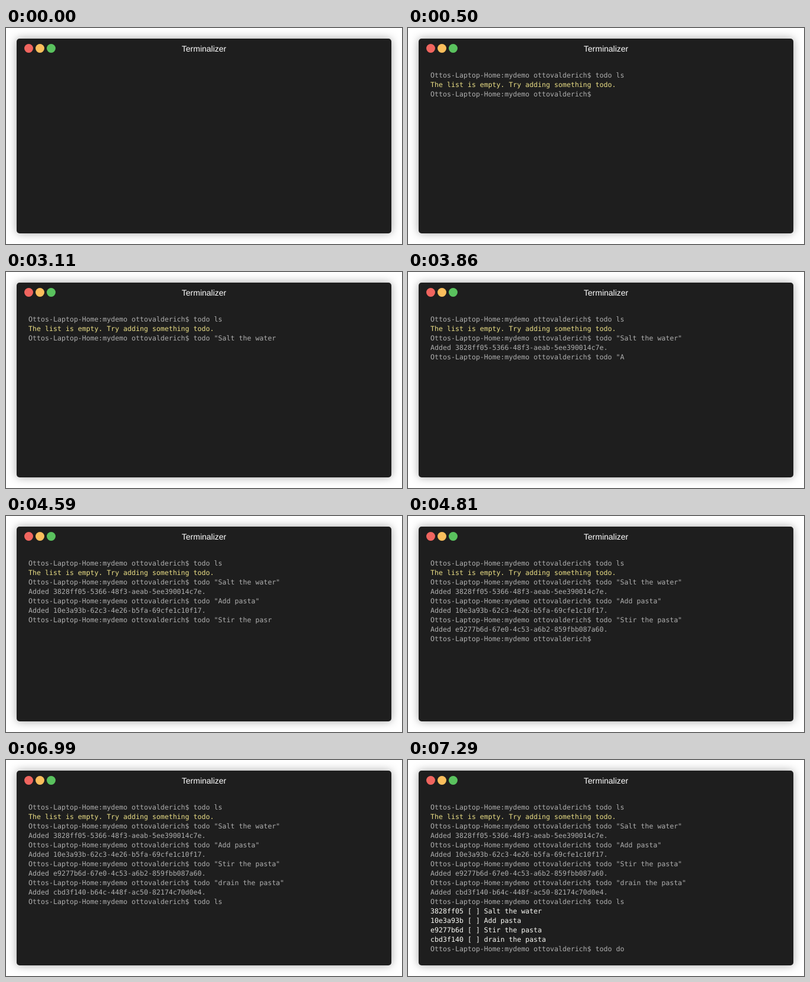
An HTML page with a canvas for the animation above (8000 ms loop, 671 px wide and 366 px high).

```html
<!DOCTYPE html>
<html lang="en">
<head>
<meta charset="utf-8">
<title>Terminal</title>
<style>
html, body { margin: 0; width: 100%; height: 100%; overflow: hidden; background: #fff; }
canvas { display: block; width: 671px; height: 366px; }
</style>
</head>
<body>
<canvas id="stage"></canvas>
<script>
const W = 671, H = 366, LOOP = 8000;
const GREY = '#afafaf', YELLOW = '#ebdf86', WHITE = '#f9f9f4';
const PROMPT = 'Ottos-Laptop-Home:mydemo ottovalderich$ ';

const canvas = document.getElementById('stage');
const ctx = canvas.getContext('2d');
const ratio = window.devicePixelRatio || 1;
canvas.width = Math.round(W * ratio);
canvas.height = Math.round(H * ratio);
ctx.scale(ratio, ratio);

const cmd = text => [PROMPT + text, GREY];
const added = id => [`Added ${id}.`, GREY];
const item = (id, text) => [`${id} [ ] ${text}`, WHITE];

const log = [
  cmd('todo ls'),
  ['The list is empty. Try adding something todo.', YELLOW],
  cmd('todo "Salt the water"'),
  added('3828ff05-5366-48f3-aeab-5ee390014c7e'),
  cmd('todo "Add pasta"'),
  added('10e3a93b-62c3-4e26-b5fa-69cfe1c10f17'),
  cmd('todo "Stir the pasta"'),
  added('e9277b6d-67e0-4c53-a6b2-859fbb087a60'),
  cmd('todo "drain the pasta"'),
  added('cbd3f140-b64c-448f-ac50-82174c70d0e4'),
  cmd('todo ls'),
  item('3828ff05', 'Salt the water'),
  item('10e3a93b', 'Add pasta'),
  item('e9277b6d', 'Stir the pasta'),
  item('cbd3f140', 'drain the pasta')
];

// start time, finished log lines, text typed at the prompt
const steps = [
  [500, 2, ''],
  [2500, 2, 'todo "Salt'],
  [3110, 2, 'todo "Salt the water'],
  [3860, 4, 'todo "A'],
  [4140, 4, 'todo "Add pasta"'],
  [4460, 6, 'todo "Stir the'],
  [4590, 6, 'todo "Stir the pasr'],
  [4680, 6, 'todo "Stir the pasta'],
  [4810, 8, ''],
  [5560, 8, 'todo "drain the pasta"'],
  [6990, 10, 'todo ls'],
  [7290, 15, 'todo do']
];

function drawWindow() {
  ctx.fillStyle = '#fff';
  ctx.fillRect(0, 0, W, H);
  ctx.save();
  ctx.shadowColor = 'rgba(0, 0, 0, 0.35)';
  ctx.shadowBlur = 15 * ratio;
  ctx.fillStyle = '#1e1e1e';
  ctx.beginPath();
  ctx.roundRect(18, 18, 635, 330, 5);
  ctx.fill();
  ctx.restore();

  ['#f0655f', '#fabe5c', '#5ac25e'].forEach((color, i) => {
    ctx.fillStyle = color;
    ctx.beginPath();
    ctx.arc(38.5 + 19 * i, 34.5, 7.5, 0, Math.PI * 2);
    ctx.fill();
  });

  ctx.fillStyle = '#fff';
  ctx.font = '14px "Liberation Sans", Arial, sans-serif';
  ctx.textAlign = 'center';
  ctx.fillText('Terminalizer', 335.5, 40);
}

function drawLine([text, color], row) {
  ctx.fillStyle = color;
  ctx.fillText(text, 38, 84 + 16 * row);
}

function draw(time) {
  drawWindow();
  const step = steps.filter(s => s[0] <= time).pop();
  if (!step) return;
  const [, count, typed] = step;
  ctx.font = '11.627px "DejaVu Sans Mono", monospace';
  ctx.textAlign = 'left';
  [...log.slice(0, count), cmd(typed)].forEach(drawLine);
}

ctx.textRendering = 'geometricPrecision';
const start = performance.now();
function tick() {
  draw((performance.now() - start) % LOOP);
  requestAnimationFrame(tick);
}
tick();
</script>
</body>
</html>
```
